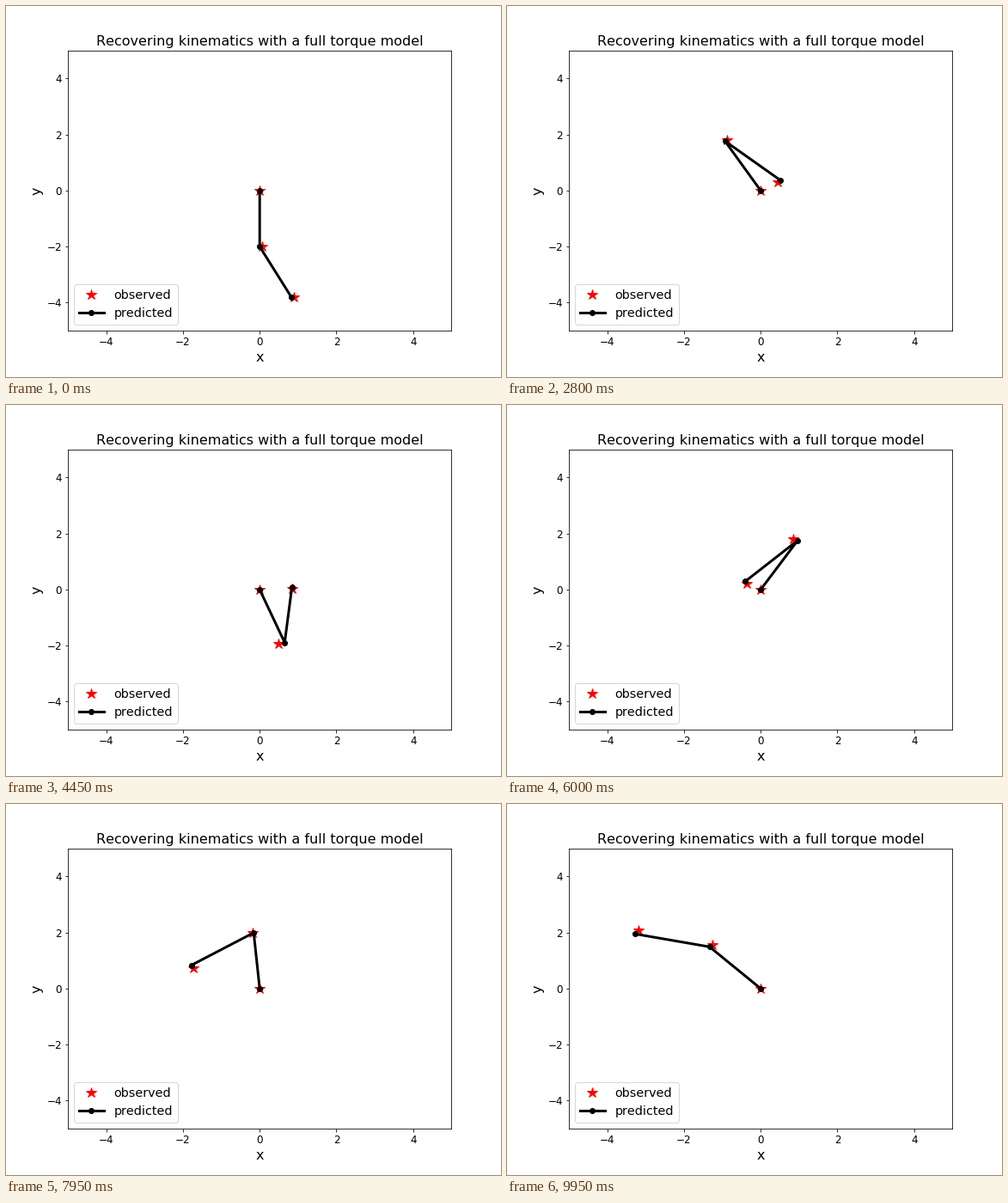
Write a matplotlib script that moves like this. It is 576 px wide and 432 px high and loops after 10000 ms.

```python
import numpy as np
import matplotlib.pyplot as plt
from matplotlib.animation import FuncAnimation

FRAMES = 200
STEP_MS = 50
LINK = 2.0

plt.rcParams.update({
    "font.family": "DejaVu Sans",
    "font.size": 12,
    "axes.titlesize": 16,
    "axes.labelsize": 16,
    "legend.fontsize": 14.4,
    "text.kerning_factor": 6,
})


def spline(knots, values, t):
    """Natural cubic spline through the knots, evaluated at t."""
    x, y = np.array(knots, float), np.array(values, float)
    n, h = len(x), np.diff(x)
    slope = np.diff(y) / h
    a, b = np.eye(n), np.zeros(n)
    for i in range(1, n - 1):
        a[i, i - 1:i + 2] = h[i - 1], 2 * (h[i - 1] + h[i]), h[i]
        b[i] = 6 * (slope[i] - slope[i - 1])
    m = np.linalg.solve(a, b)
    k = np.clip(np.searchsorted(x, t, side="right") - 1, 0, n - 2)
    u, w, hk = t - x[k], x[k + 1] - t, h[k]
    return ((m[k] * w**3 + m[k + 1] * u**3) / (6 * hk)
            + (y[k] / hk - m[k] * hk / 6) * w
            + (y[k + 1] / hk - m[k + 1] * hk / 6) * u)


def arm(upper, lower):
    """Joint positions per frame; angles in degrees from straight down."""
    angles = np.radians([np.zeros_like(upper), upper, lower])
    lengths = np.array([[0], [LINK], [LINK]])
    xs = np.cumsum(lengths * np.sin(angles), axis=0)
    ys = np.cumsum(-lengths * np.cos(angles), axis=0)
    return xs.T, ys.T


t = np.arange(FRAMES) * STEP_MS / 1000

# The upper link spins up clockwise.
spin_t = [0, 1.05, 2.1, 2.8, 4.45, 6, 7.1, 8.85, 9.95]
upper = spline(spin_t, [1.8, -17, -96, -154, -346, -565, -743, -1052, -1221], t)

# After a first sway the elbow folds or unfolds half a turn at each time.
fold_t = [0, .9, 1.65, 2.68, 3.69, 4.58, 5.45, 6.04, 6.62,
          7.08, 7.66, 8.08, 8.55, 8.97, 9.84, 10.3]
fold = np.r_[23, 5, 90, 180 * np.arange(1, len(fold_t) - 2)]
lower = upper + spline(fold_t, fold, t)

# The prediction wavers around the truth; the lower link drifts a bit more.
error = spline(spin_t, [-1.8, 0, 1, 1.8, 5, -3.8, -2, 0, 2.8], t)
drift = 3 * np.sin(2 * np.pi * (4.6 - t) / 11.2)

obs_x, obs_y = arm(upper, lower)
pred_x, pred_y = arm(upper + error, lower + error + drift)

fig = plt.figure(figsize=(8, 6), dpi=72, facecolor="white")
fig.subplots_adjust(left=.125, right=.9, bottom=.125, top=.88)
ax = fig.add_subplot()
ax.set(xlim=(-5, 5), ylim=(-5, 5), xlabel="x", ylabel="y",
       xticks=range(-4, 5, 2), yticks=range(-4, 5, 2),
       title="Recovering kinematics with a full torque model")

observed, = ax.plot([], [], "r*", ms=12, label="observed")
predicted, = ax.plot([], [], "ko-", lw=3, ms=6, label="predicted")
ax.legend(loc="lower left")


def draw(i):
    observed.set_data(obs_x[i], obs_y[i])
    predicted.set_data(pred_x[i], pred_y[i])
    return observed, predicted


anim = FuncAnimation(fig, draw, frames=FRAMES, interval=STEP_MS,
                     repeat=True, repeat_delay=0)
plt.show()
```
